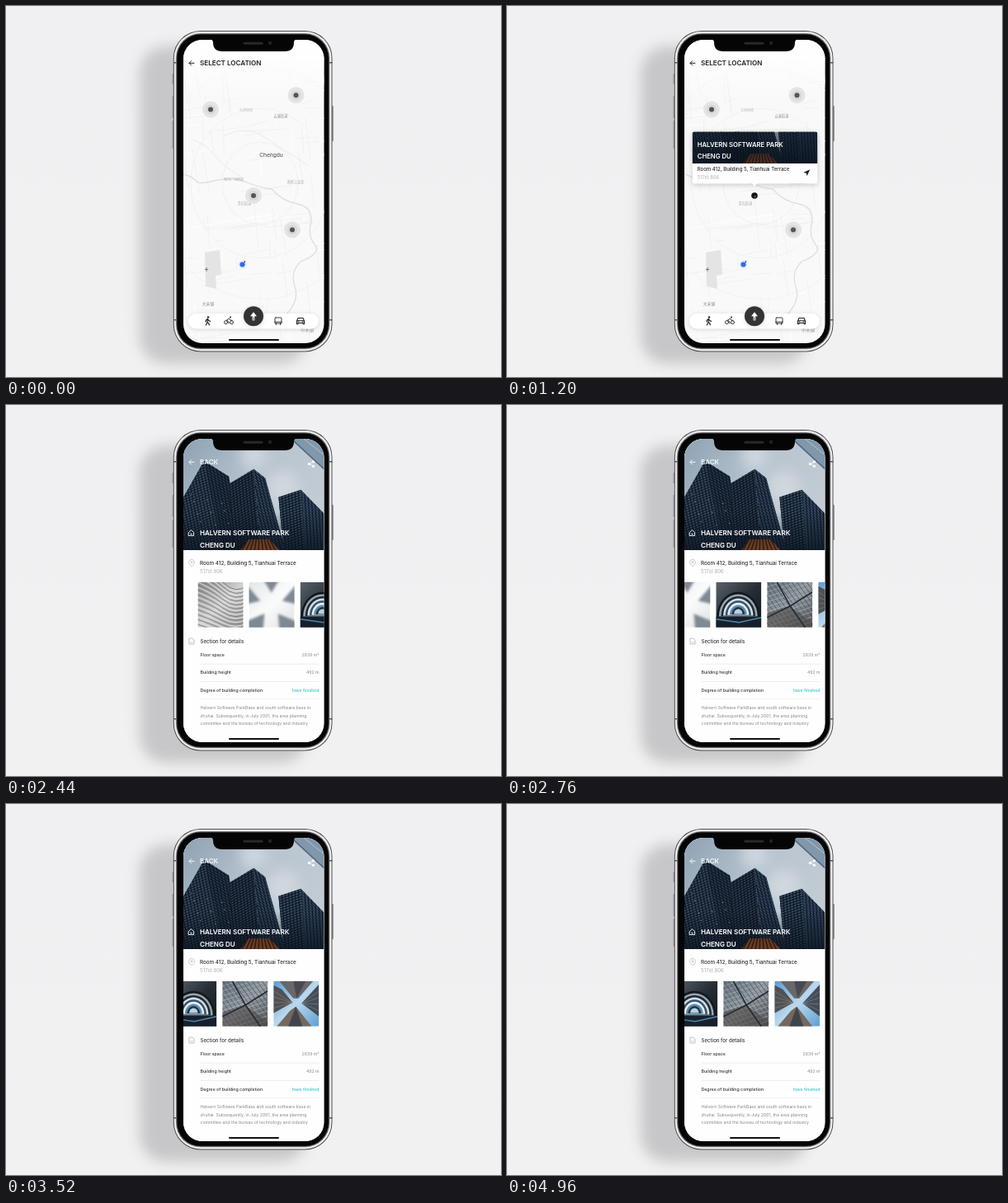
An HTML page with a canvas for the animation above (5000 ms loop, 600 by 450 pixels).

```html
<!DOCTYPE html>
<html lang="en">
<head>
<meta charset="utf-8">
<title>Select location</title>
<style>
  html, body { margin: 0; width: 100%; height: 100%; overflow: hidden; background: #f1f0f1; }
  canvas { display: block; }
</style>
</head>
<body>
<canvas id="stage" width="600" height="450"></canvas>
<script>
const ctx = document.getElementById('stage').getContext('2d');
const LOOP = 5000;
const TITLE = 'HALVERN SOFTWARE PARK';
const ADDRESS = 'Room 412, Building 5, Tianhuai Terrace';

const lerp = (a, b, p) => a + (b - a) * p;
const ramp = (t, a, b) => Math.min(1, Math.max(0, (t - a) / (b - a)));
const easeOut = p => 1 - (1 - p) ** 3;
const easeSine = p => 0.5 - 0.5 * Math.cos(Math.PI * p);
const easeBack = p => 1 + 2.2 * (p - 1) ** 3 + 1.2 * (p - 1) ** 2;

function scoped(draw, alpha = 1) {
  if (alpha <= 0) return;
  ctx.save();
  ctx.globalAlpha *= alpha;
  draw();
  ctx.restore();
}
function box(x, y, w, h, color, r = 0) {
  ctx.beginPath();
  ctx.roundRect(x, y, w, h, r);
  ctx.fillStyle = color;
  ctx.fill();
}
function disc(x, y, r, color) {
  ctx.beginPath();
  ctx.arc(x, y, r, 0, Math.PI * 2);
  ctx.fillStyle = color;
  ctx.fill();
}
function trace(points) {
  ctx.beginPath();
  for (let i = 0; i < points.length; i += 2) ctx.lineTo(points[i], points[i + 1]);
}
function poly(points, color) {
  trace(points);
  ctx.fillStyle = color;
  ctx.fill();
}
function line(points, color, width = 1) {
  trace(points);
  ctx.strokeStyle = color;
  ctx.lineWidth = width;
  ctx.stroke();
}
function clipBox(x, y, w, h, r = 0) {
  ctx.beginPath();
  ctx.roundRect(x, y, w, h, r);
  ctx.clip();
}
function text(str, x, y, size, color, weight = 400, align = 'left', font = 'Inter') {
  ctx.font = `${weight} ${size}px "${font}", sans-serif`;
  ctx.textAlign = align;
  ctx.fillStyle = color;
  ctx.fillText(str, x, y);
}
// Path centred on its own origin; a width of 0 fills it.
function icon(d, x, y, color, width = 0.9) {
  scoped(() => {
    ctx.translate(x, y);
    ctx.lineCap = ctx.lineJoin = 'round';
    const path = new Path2D(d);
    ctx.fillStyle = ctx.strokeStyle = color;
    ctx.lineWidth = width;
    width ? ctx.stroke(path) : ctx.fill(path);
  });
}
function gradient(x0, y0, x1, y1, ...colors) {
  const g = ctx.createLinearGradient(x0, y0, x1, y1);
  colors.forEach((c, i) => g.addColorStop(i / (colors.length - 1), c));
  return g;
}

const ARROW = 'M3 0H-3M-.3-2.7L-3 0L-.3 2.7';

function drawPhone() {
  box(0, 0, 600, 450, gradient(0, 0, 0, 450, '#f0eff1', '#f2f1f2'));
  scoped(() => {
    ctx.filter = 'blur(8px)';
    box(162, 49, 203, 385, '#c7c7c9', 32);
  });
  for (const [y, h] of [[82, 13], [109, 27], [139, 34]]) box(201.5, y, 2, h, '#98989a', 0.7);
  box(395, 121, 2, 43, '#98989a', 0.7);
  const rings = [[0, '#4a4a4c'], [1, '#f3f3f4'], [2.8, '#bdbdc0'], [3.6, '#4a4a4c'], [4.6, '#050505']];
  for (const [d, color] of rings) box(202.8 + d, 30 + d, 192.7 - 2 * d, 389.4 - 2 * d, color, 33 - d);
  for (const x of [203, 392]) for (const y of [68, 380]) box(x, y, 3.5, 1.5, '#555');
}

function drawNotch() {
  ctx.beginPath();
  ctx.moveTo(247, 40);
  ctx.quadraticCurveTo(251, 41, 251, 44);
  ctx.quadraticCurveTo(251, 55, 262, 55);
  ctx.lineTo(338, 55);
  ctx.quadraticCurveTo(349, 55, 349, 44);
  ctx.quadraticCurveTo(349, 41, 353, 40);
  ctx.fillStyle = '#050505';
  ctx.fill();
  box(287.5, 43.7, 24, 3, '#29292b', 1.5);
  disc(320, 45, 2.2, '#20222a');
  box(270, 404, 61, 1.9, '#111', 1);
}

function drawMap() {
  box(214, 40, 172, 370, '#f9f9f9');
  let seed = 17;
  const rnd = () => (seed = (seed * 16807) % 2147483647) / 2147483647;
  scoped(() => {
    ctx.translate(300, 225);
    ctx.rotate(-0.12);
    for (let i = 0; i < 150; i++) {
      const x = lerp(-110, 110, rnd()), y = lerp(-200, 200, rnd()), size = 10 + rnd() * 55;
      const bend = (rnd() - 0.5) * 8;
      line(i % 2 ? [x, y, x + size, y + bend] : [x, y, x + bend, y + size], i % 3 ? '#f0f0f0' : '#fff', 0.8);
    }
  });
  for (const r of [46, 84, 130]) {
    ctx.beginPath();
    ctx.ellipse(308, 215, r, r * 1.08, 0, 0, Math.PI * 2);
    ctx.strokeStyle = '#f1f1f1';
    ctx.lineWidth = 1;
    ctx.stroke();
  }
  poly([241, 299, 259, 296, 261, 326, 254, 327, 255, 343, 242, 340], '#e4e4e4');
  icon('M215 204Q226 207 230 212T252 212Q274 207 292 214T322 222Q335 237 353 240T370 262Q365 278 374 289T357 310Q344 323 350 340T340 374',
    0, 0, '#dfdfdf', 1.3);
  icon('M227 162Q244 169 253 181T284 207M264 158Q290 143 315 160T366 193', 0, 0, '#e8e8e8', 0.9);
  box(214, 40, 172, 75, gradient(0, 55, 0, 115, '#ffffffee', '#ffffff00'));
  const label = (str, x, y, size, color) => text(str, x, y, size, color, 400, 'center', 'Noto Sans CJK SC');
  label('云溪街道', 333, 135, 4.2, '#888');
  label('东林街道', 291, 128, 4, '#bbb');
  label('西河广场街道', 276, 212, 4, '#aaa');
  label('南桥工业区', 351, 215, 4.2, '#aaa');
  label('青石街道', 289, 241, 4.2, '#aaa');
  label('大禾铺', 245, 363, 4.8, '#888');
  label('中禾镇', 365, 395, 5.3, '#999');
  text('Chengdu', 321.5, 182.5, 7.2, '#555', 400, 'center', 'Roboto');
  icon('M0-2V2M-1.8 0H1.8', 243, 319.5, '#666', 0.8);
}

function drawCluster(x, y, chosen = 0) {
  scoped(() => {
    disc(x, y, 10, '#e4e4e4');
    disc(x, y, 6, '#d8d8d8');
  }, 1 - chosen);
  disc(x, y, 3 + chosen * 0.8, chosen > 0.5 ? '#151515' : '#555');
  if (chosen > 0) scoped(() => disc(x + 0.8, y + 1, 0.8, '#aaa'), chosen);
}

function drawNav() {
  scoped(() => {
    ctx.shadowColor = 'rgba(0,0,0,.13)';
    ctx.shadowBlur = 5;
    ctx.shadowOffsetY = 1;
    box(221, 373, 158, 18.5, '#fff', 9);
    disc(300, 376.3, 12, '#333335');
  });
  icon('M0-5.3L4-.3H1.4V4.7H-1.4V-.3H-4Z', 300, 376.5, '#fff', 0);
  icon('M-1 1H1V5H-1Z', 300, 376.5, '#aaa', 0);
  const ink = '#222';
  disc(245, 377.4, 1.2, ink);
  icon('M0-2.5L-1.8-1.2L-2.5 1M0-2.5L1.2-.5L3 .4M0-2.5L-.4 1.5L-2.2 5M-.4 1.5L1.3 3L1.8 5', 244.5, 382, ink, 1.2);
  icon('M-1.5 1.7A2 2 0 1 1-5.5 1.7A2 2 0 1 1-1.5 1.7M5.5 1.7A2 2 0 1 1 1.5 1.7A2 2 0 1 1 5.5 1.7M-2.5-.8L.5-3L2-.8H4M-2.5-.8L0 1V3', 270, 382, ink);
  disc(272, 377.6, 1, ink);
  icon('M-3.2-4H3.2Q4-4 4-3V3H-4V-3Q-4-4-3.2-4M-4 1.2H4M-2.5 3V4.5M2.5 3V4.5', 330, 382, ink);
  icon('M-4.5 3.8V0L-3-3.5H3L4.5 0V3.8H3V2.5H-3V3.8ZM-4.5-.3H4.5M-3 1H-2M2 1H3', 357, 382, ink, 1.1);
}

function drawMapScreen(t) {
  drawMap();
  drawCluster(248, 125.5);
  drawCluster(351.5, 108.3);
  drawCluster(347, 271.5);
  drawCluster(300, 230, ramp(t, 960, 1120));
  disc(286.5, 313.5, 5, '#e6ebf8');
  disc(286.5, 313.5, 3.1, '#2f6bea');
  poly([288, 310.3, 290.2, 308.5, 289.9, 311.6], '#3c4f80');
  icon(ARROW, 225, 69.3, '#222', 1);
  text('SELECT LOCATION', 235, 72.3, 8.1, '#222', 600);
  drawNav();
}

function tower(points, color, windows, slope, lean) {
  scoped(() => {
    poly(points, color);
    ctx.clip();
    for (let y = -10; y < 260; y += 3.2) line([210, y - 90 * slope, 390, y + 90 * slope], windows, 0.8);
    for (let x = 150; x < 430; x += 4) line([x, 50, x + lean, 180], '#0b1420', 1);
  });
}

function drawSkyline() {
  box(215, 41, 170, 135, gradient(215, 41, 385, 150, '#8ea2b3', '#b9c5d0', '#c5cdd5'));
  scoped(() => {
    ctx.filter = 'blur(8px)';
    disc(300, 62, 16, '#ced7df');
    disc(335, 100, 20, '#d0d7dd');
  });
  poly([345, 41, 385, 78, 385, 41], '#8197ab');
  line([345, 41, 385, 78], '#52687f', 1.6);
  line([360, 41, 385, 61], '#a9bac8', 1);
  tower([215, 112, 240, 68, 264, 176, 215, 176], '#1b293b', '#536377', -0.4, 25);
  tower([240, 68, 270, 87, 285, 176, 262, 176], '#152130', '#3a4b60', 0.6, 24);
  tower([270, 96, 300, 78, 308, 176, 277, 176], '#131e2d', '#46566a', -0.55, 12);
  tower([300, 78, 314, 89, 338, 176, 308, 176], '#1d2c3e', '#4b5f76', 0.75, 32);
  tower([330, 112, 357, 103, 362, 176, 336, 176], '#172536', '#5b7087', -0.35, 9);
  tower([357, 103, 385, 132, 385, 176, 362, 176], '#203247', '#4a6079', 0.9, 8);
  box(215, 130, 170, 46, gradient(0, 130, 0, 176, '#08111b00', '#08111baa'));
  poly([284, 176, 294, 163, 319, 163, 331, 176], '#6b3d21');
  for (let x = 286; x < 330; x += 5) line([x, 176, lerp(x, 307, 0.35), 163], '#28191a', 1.4);
  for (let i = 0; i < 12; i++) box(224 + (i * 29) % 50, 108 + (i * 37) % 50, 1.2, 0.8, '#c69b66');
}

const thumbs = [
  () => {
    box(0, 0, 55, 55, gradient(0, 0, 55, 55, '#868686', '#d0d0d0', '#999'));
    for (let i = 0; i < 26; i++) icon(`M-4 ${i * 3 - 22}Q14 ${i * 3 - 16} 30 ${i * 2.6}T60 ${i * 2.4 + 4}`, 0, 0, i % 2 ? '#e6e6e6' : '#7a7a7a', 0.9);
  },
  () => {
    box(0, 0, 55, 55, gradient(0, 0, 55, 55, '#e3e6e8', '#fbfbfb', '#dfe3e6'));
    scoped(() => {
      ctx.filter = 'blur(1.5px)';
      for (let i = 0; i < 5; i++) {
        const a = i * 1.257 - 1.57, dx = Math.cos(a), dy = Math.sin(a);
        poly([27 + dx * 14, 27 + dy * 14, 27 + dx * 42 - dy * 17, 27 + dy * 42 + dx * 17,
          27 + dx * 42 + dy * 17, 27 + dy * 42 - dx * 17], '#7f8992');
      }
    });
  },
  () => {
    box(0, 0, 55, 55, gradient(0, 0, 55, 55, '#59636c', '#262d34', '#11171d'));
    ['#11181f', '#9aa5ad', '#1d2a36', '#d4dee5', '#34536a', '#e6eef2', '#5b8cae', '#1d3447', '#b7d1df'].forEach((color, i) => {
      ctx.beginPath();
      ctx.ellipse(27, 42 - i * 0.4, 26 - i * 2.6, 30 - i * 3, 0, Math.PI, Math.PI * 2);
      ctx.fillStyle = color;
      ctx.fill();
    });
    box(0, 42, 55, 13, '#17202a');
    line([0, 45, 28, 49, 55, 43], '#4d86ad', 1.4);
  },
  () => {
    box(0, 0, 55, 55, gradient(0, 0, 55, 55, '#64717d', '#929aa0', '#4e4f51'));
    for (let i = -10; i < 14; i++) {
      line([i * 6, 0, i * 6 + 40, 55], '#3d4851', 0.7);
      line([0, i * 6 + 18, 55, i * 6], '#b4bdc3', 0.6);
    }
    poly([0, 38, 27, 29, 55, 49, 55, 55, 0, 55], '#4d484699');
    line([12, 0, 28, 29, 55, 12], '#232a31', 1.6);
    line([0, 43, 28, 29, 46, 55], '#272a2e', 1.6);
  },
  () => {
    box(0, 0, 55, 55, gradient(0, 0, 55, 55, '#5d9bd2', '#b9d8ee', '#5f9fd3'));
    poly([0, 5, 10, 10, 23, 26, 0, 39], '#4f5155');
    poly([7, 0, 48, 0, 30, 21, 24, 21], '#696769');
    poly([55, 4, 55, 43, 34, 27], '#464c55');
    poly([4, 55, 20, 36, 27, 31, 46, 55], '#73685f');
    poly([18, 55, 27, 31, 35, 55], '#40454d');
    poly([24, 0, 28, 21, 39, 0], '#474b51');
    for (let i = 0; i < 4; i++) {
      line([0, 12 + i * 7, 22, 26], '#96816f', 0.6);
      line([55, 12 + i * 8, 35, 27], '#7d8c9b', 0.6);
    }
  }
];

function drawThumbs(t) {
  const scroll = 159 * easeSine(ramp(t, 2390, 3000));
  const shown = ramp(t, 1820, 2040);
  scoped(() => thumbs.forEach((paint, i) => scoped(() => {
    ctx.translate(235.3 + i * 62 - scroll, 214.8);
    clipBox(0, 0, 55, 55);
    if (shown < 1) ctx.filter = `grayscale(${1 - shown ** 3})`;
    paint();
  })), shown);
}

function drawDetails(t) {
  scoped(() => {
    icon('M-2.7-3.5H1L3-1.5V3.5H-2.7ZM-1 1.3Q0 2.3 1.2 1.3', 225, 286.5, '#aaa', 0.7);
  }, ramp(t, 1820, 1960));
  const reveal = (order, draw) => {
    const p = easeOut(ramp(t, 1940 + order * 40, 2160 + order * 40));
    scoped(() => {
      ctx.translate(0, 8 * (1 - p));
      draw();
    }, p);
  };
  reveal(0, () => text('Section for details', 235.5, 288.5, 6.1, '#333', 500));
  const rows = [
    ['Floor space', '2839 m²', '#999'],
    ['Building height', '492 m', '#999'],
    ['Degree of building completion', 'have finished', '#2fc5c5']
  ];
  rows.forEach(([name, value, color], i) => reveal(i + 1, () => {
    const y = 305 + i * 21.3;
    text(name, 235.5, y, 5.25, '#333', 500);
    text(value, 379.5, y, 5.1, color, 500, 'right');
    box(235.5, y + 8.8, 144, 0.6, '#e8e8e8');
  }));
  reveal(4, () => [
    'Halvern Software ParkBase and south software base in',
    'zhuhai. Subsequently, in July 2001, the area planning',
    'committee and the bureau of technology and industry'
  ].forEach((str, i) => text(str, 235.5, 369.3 + i * 9.3, 5.15, '#888')));
}

function drawShare(t) {
  const open = easeOut(ramp(t, 4200, 4360)) * (1 - easeOut(ramp(t, 4620, 4820)));
  if (open > 0) {
    scoped(() => {
      const h = lerp(19, 40, open);
      box(360.8, 61, 18.4, h, '#ffffff66', 9.2);
      disc(370, 70.5, 8.8, '#ffffff66');
      disc(370, 61 + h - 9.5, 8.8, '#ffffff22');
    }, open);
  }
  scoped(() => {
    icon('M372.3 69L367.5 71.5L372.3 74', 0, 0, '#fff', 0.9);
  }, 1 - open);
  disc(lerp(367.3, 366.3, open), lerp(71.5, 70, open), 1.5, '#fff');
  disc(372.5, 68.8, 1.5, '#fff');
  disc(lerp(372.5, 369.5, open), lerp(74.2, 75, open), 1.5, '#fff');
}

// The place card at p = 0 grows into the full page at p = 1; its width settles before its height.
function drawPlace(t, p) {
  const wide = Math.min(1, p * 1.2);
  const x = lerp(225, 215, wide), y = lerp(153, 41, p), w = lerp(151, 170.5, wide);
  const photoEnd = lerp(191, 176, wide), end = lerp(215.5, 410, wide);
  scoped(() => box(214, 40, 172, 370, '#fefefe'), wide);
  scoped(() => {
    ctx.shadowColor = `rgba(0,0,0,${0.2 * (1 - wide)})`;
    ctx.shadowBlur = 6;
    ctx.shadowOffsetY = 1.5;
    box(x, y, w, end - y, '#fefefe', 2 * (1 - wide));
  });
  scoped(() => poly([297, 215, 303, 215, 300, 219], '#fefefe'), 1 - wide);
  scoped(() => {
    clipBox(x, y, w, photoEnd - y, [2 * (1 - wide), 2 * (1 - wide), 0, 0]);
    ctx.translate(x, photoEnd);
    ctx.scale(w / 170, w / 170);
    ctx.translate(-215, -176);
    drawSkyline();
    scoped(() => box(215, 41, 170, 135, '#08101b'), 0.35 * (1 - wide));
  });
  const titleX = lerp(231, 235, p), titleSize = lerp(7.7, 8.05, p);
  text(TITLE, titleX, lerp(170.8, 158.3, p), titleSize, '#fff', 600);
  text('CHENG DU', titleX, lerp(185, 173, p), titleSize, '#fff', 600);
  text(ADDRESS, titleX, lerp(200, 193.8, p), lerp(6, 6.3, p), '#2c2c2c', 500);
  text('517st.806', titleX, lerp(209.7, 203.8, p), lerp(5.8, 6.2, p), '#b0b0b0');
  scoped(() => icon('M4-4L-4-.3L-.4.5L.4 4Z', 363, 202.3, '#222', 0), 1 - p * 2);
  scoped(() => {
    icon(ARROW, 225, 69.3, '#fff', 0.9);
    text('BACK', 235, 72.3, 8, '#fff', 500);
    icon('M-3-.7L0-3.5L3-.7V3.3H-3ZM-1 1.4H1', 224.5, 155.2, '#fff', 0.9);
    icon('M0 4L-2.8 1.7A3.6 3.6 0 1 1 2.8 1.7ZM1-.7A1 1 0 1 1-1-.7A1 1 0 1 1 1-.7', 225, 191.5, '#aaa', 0.6);
    drawShare(t);
  }, p);
  drawThumbs(t);
  drawDetails(t);
}

function draw(t) {
  drawPhone();
  scoped(() => {
    clipBox(215, 41, 170.5, 368, 23);
    const page = easeOut(ramp(t, 1760, 2075));
    if (page < 1) drawMapScreen(t);
    const pop = easeBack(ramp(t, 980, 1460));
    if (t > 980 && pop > 0) scoped(() => {
      ctx.translate(300, 222);
      ctx.scale(pop, pop);
      ctx.translate(-300, -222);
      drawPlace(t, page);
    }, Math.min(1, pop * 1.2));
  });
  drawNotch();
}

function tick() {
  draw(performance.now() % LOOP);
  requestAnimationFrame(tick);
}
tick();
</script>
</body>
</html>
```
